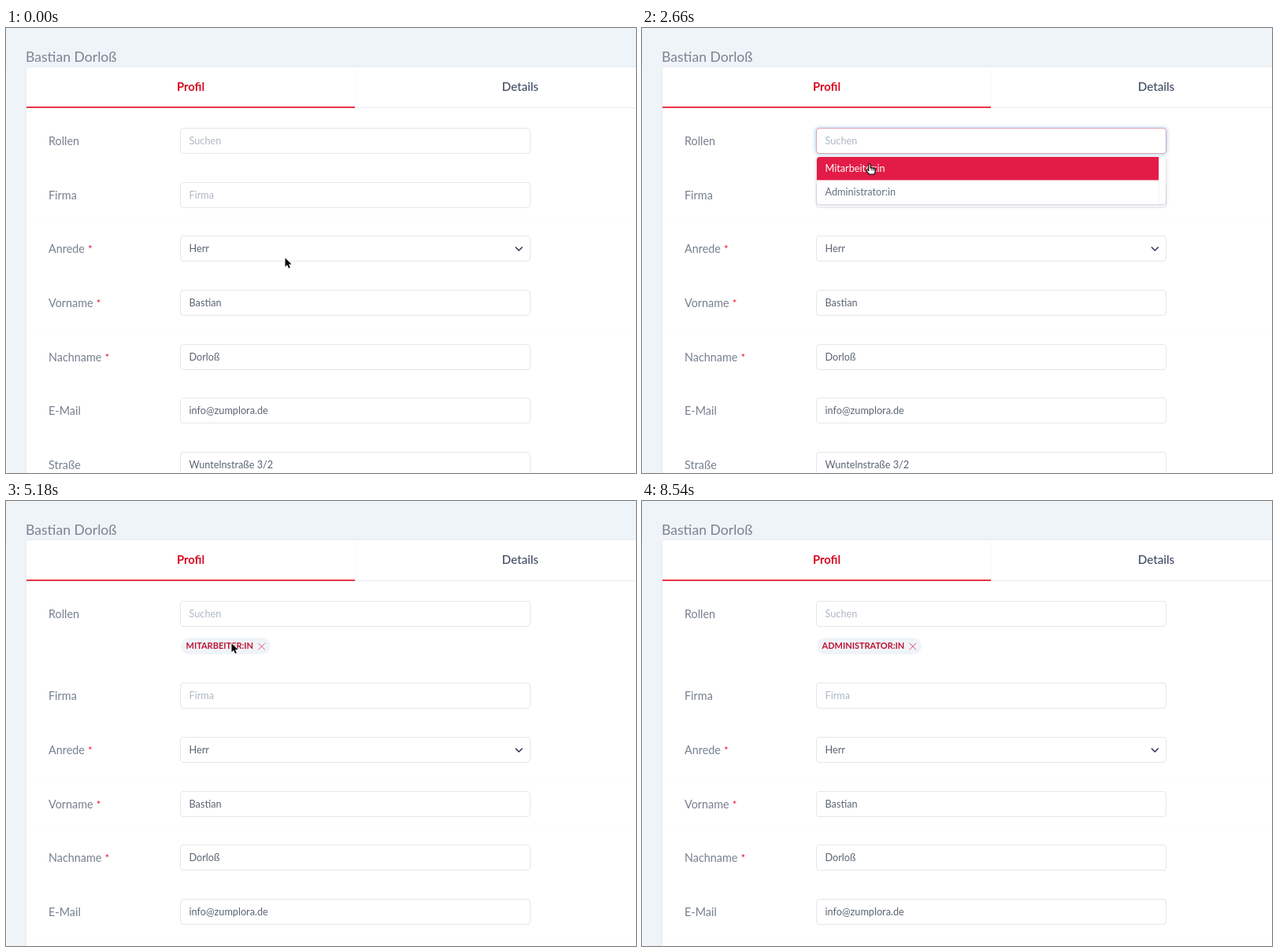
Write an HTML page with a canvas that moves like this. It is 800 px wide and 566 px high and loops after 8.61 s.

```html
<!DOCTYPE html>
<html lang="de">
<head>
<meta charset="utf-8">
<title>Profil</title>
<style>
  html, body { margin: 0; width: 100%; height: 100%; overflow: hidden; background: #eff4f9; }
  canvas { display: block; width: 800px; height: 566px; }
</style>
</head>
<body>
<canvas id="stage" width="800" height="566"></canvas>
<script>
const ctx = document.getElementById('stage').getContext('2d');
const LOOP = 8610, STEP = 70;
const FONT = 'Lato, "Open Sans", sans-serif';
const RED = '#e3061b';
const ROW = 68.65, TAG_SHIFT = 35.7;

const rows = [
  { label: 'Rollen', hint: 'Suchen' },
  { label: 'Firma', hint: 'Firma' },
  { label: 'Anrede', value: 'Herr', required: true, select: true },
  { label: 'Vorname', value: 'Bastian', required: true },
  { label: 'Nachname', value: 'Dorloß', required: true },
  { label: 'E-Mail', value: 'info@zumplora.de' },
  { label: 'Straße', value: 'Wuntelnstraße 3/2' }
];

// Pointer path: time, x, y
const path = [
  [0, 354.5, 292.5], [280, 354.5, 292.5], [1400, 284, 155.5], [2030, 284, 155.5],
  [2450, 289, 173], [3850, 289, 173], [4270, 286, 180],
  [5180, 286.5, 181], [5810, 324, 184], [6370, 324, 184], [6650, 318.5, 154],
  [7140, 318, 155], [7490, 304, 206], [8400, 304, 206]
];

const clicks = [1750, 4410, 6160, 6930, 7770];
const RING_TIME = 210;
const focusSpans = [[1750, 4410], [6930, 7770]];
const menuSpans = [[2030, 4620], [7070, 7910]];
const tagSpans = [[4620, 6300, 'MITARBEITER:IN'], [7910, LOOP, 'ADMINISTRATOR:IN']];

const spanAt = (spans, t) => spans.find(s => t >= s[0] && t < s[1]);
const rowTop = (i, shift) => Math.round(127 + ROW * i + (i ? shift : 0));

function pointerAt(t) {
  const i = path.findIndex(p => p[0] > t);
  if (i < 0) return null;
  const [t0, x0, y0] = path[i - 1], [t1, x1, y1] = path[i];
  const u = (t - t0) / (t1 - t0), k = u * u * (3 - 2 * u);
  return { x: x0 + (x1 - x0) * k, y: y0 + (y1 - y0) * k };
}

function text(str, x, y, size, color, weight = 400, align = 'left') {
  ctx.font = `${weight} ${size}px ${FONT}`;
  ctx.fillStyle = color;
  ctx.textAlign = align;
  ctx.fillText(str, x, y);
  return ctx.measureText(str).width;
}

function rect(x, y, w, h, color) {
  ctx.fillStyle = color;
  ctx.fillRect(x, y, w, h);
}

function box(x, y, w, h, r, fill, stroke) {
  ctx.beginPath();
  ctx.roundRect(x, y, w, h, r);
  if (fill) { ctx.fillStyle = fill; ctx.fill(); }
  if (stroke) { ctx.strokeStyle = stroke; ctx.lineWidth = 1; ctx.stroke(); }
}

function shadow(color, blur, y = 0) {
  ctx.shadowColor = color;
  ctx.shadowBlur = blur;
  ctx.shadowOffsetY = y;
}

function line(points, color, width) {
  ctx.beginPath();
  points.forEach(([x, y], i) => i ? ctx.lineTo(x, y) : ctx.moveTo(x, y));
  ctx.strokeStyle = color;
  ctx.lineWidth = width;
  ctx.lineCap = ctx.lineJoin = 'round';
  ctx.stroke();
}

function drawPage() {
  rect(0, 0, 800, 566, '#eff4f9');
  rect(0, 50, 1, 516, '#f7fafc');
  text('Bastian Dorloß', 25, 42.5, 17.6, '#7b8391');
  ctx.save();
  shadow('rgba(90,110,140,.1)', 3);
  box(26, 50, 800, 560, 4, '#fff');
  ctx.restore();
  rect(443, 50, 1, 51, '#f8f9fb');
  rect(443, 101, 357, 1, '#e9ecf0');
  rect(26, 100, 417, 1.6, RED);
  text('Profil', 234.5, 80, 14.8, '#d50c23', 700, 'center');
  text('Details', 653, 80, 15.2, '#414b63', 500, 'center');
}

function drawRow(row, i, shift, focused, caret) {
  const y = rowTop(i, shift);
  const w = text(row.label, 54, y + 21.5, 14.4, '#768090');
  if (row.required) text('*', 54 + w + 4, y + 21.5, 13.5, '#ea1930');
  if (focused) {
    ctx.save();
    shadow('#9fcdea', 5);
    box(220.5, y, 446, 33, 4, '#d5eaf7');
    ctx.restore();
  }
  box(221.5, y + 0.5, 444, 32, 3.5, '#fff', focused ? '#dfa4b3' : '#e3e7ec');
  text(row.value || row.hint, 232.5, y + 21, 12.7, row.value ? '#5a6473' : '#aeb8c6');
  if (caret) rect(232, y + 8, 1, 17, '#7d8796');
  if (row.select) {
    line([[647.3, y + 15], [651.3, y + 19], [655.3, y + 15]], '#28324c', 1.5);
  }
  if (i) rect(30, y + 50, 770, 1, '#fcfdfd');
}

function drawTag(name) {
  ctx.font = `700 11px ${FONT}`;
  const w = ctx.measureText(name).width;
  box(222, 174, w + 28, 21, 10.5, '#eff4f9');
  text(name, 228.5, 188.3, 11, '#bd1232', 700);
  const x = 228.5 + w + 10.5, y = 185;
  line([[x - 4, y - 4], [x + 4, y + 4]], '#e2546c', 1);
  line([[x + 4, y - 4], [x - 4, y + 4]], '#e2546c', 1);
}

function drawMenu(active) {
  ctx.save();
  shadow('rgba(60,75,100,.3)', 4, 1);
  box(222, 163.5, 443, 60.5, 4, '#fff');
  ctx.restore();
  rect(656, 165, 1, 57, '#f1f3f6');
  const radius = active ? [0, 0, 0, 4] : [4, 0, 0, 0];
  box(222, active ? 194 : 164, 434, 29.5, radius, '#e31b47');
  ['Mitarbeiter:in', 'Administrator:in'].forEach((name, i) => {
    text(name, 232.5, 182.7 + 30.3 * i, 12.7, i === active ? '#fff' : '#647081');
  });
}

const arrow = new Path2D('M0 0V11.2L2.6 8.8L4.5 13L6.3 12.2L4.6 8.1H8.1Z');
const hand = new Path2D('M-1.2 .8C-1.2 -.7 1.1 -.7 1.2 .8V5L2.6 4.6L3.6 5.2L5 4.9L6 5.8L7.4 6V9.3L6 13.2H-.5L-4.2 8.6C-4.8 7.3 -3.6 6.6 -2.5 7.5L-1.2 8.6Z');

function drawPointer(p, kind) {
  ctx.save();
  ctx.translate(p.x, p.y);
  ctx.lineJoin = 'round';
  if (kind === 'beam') {
    const bars = [
      [[-3, -6], [-1, -6], [0, -5], [1, -6], [3, -6]],
      [[0, -5], [0, 5]],
      [[-3, 6], [-1, 6], [0, 5], [1, 6], [3, 6]],
      [[-1.5, 2], [1.5, 2]]
    ];
    bars.forEach(b => line(b, '#fff', 2.4));
    bars.forEach(b => line(b, '#333', 1.1));
  } else if (kind === 'hand') {
    ctx.fillStyle = '#fff';
    ctx.fill(hand);
    ctx.strokeStyle = '#111';
    ctx.lineWidth = 1.2;
    ctx.stroke(hand);
    [[2.2, 5], [4.2, 5.2], [6, 6]].forEach(([x, y]) => line([[x, y], [x, y + 3]], '#222', 0.8));
  } else {
    ctx.strokeStyle = '#fff';
    ctx.lineWidth = 1.8;
    ctx.stroke(arrow);
    ctx.fillStyle = '#0a0a0a';
    ctx.fill(arrow);
  }
  ctx.restore();
}

function pointerKind(p, clicking, menu, tag, shift) {
  if (clicking) return 'arrow';
  if (menu && p.y > 164 && p.y < 224) return 'hand';
  if (tag && p.x > 318 && p.x < 332 && p.y > 176 && p.y < 194) return 'hand';
  const inField = p.x > 221 && p.x < 666 && rows.some((row, i) => {
    const top = rowTop(i, shift);
    return !row.select && p.y > top && p.y < top + 33;
  });
  return inField ? 'beam' : 'arrow';
}

function draw(t) {
  const focus = spanAt(focusSpans, t), menu = spanAt(menuSpans, t), tag = spanAt(tagSpans, t);
  const shift = tag ? TAG_SHIFT : 0;
  const caret = focus && (t - focus[0]) % 1000 < 500;
  const p = pointerAt(t);

  drawPage();
  rows.forEach((row, i) => drawRow(row, i, shift, focus && i === 0, caret && i === 0));
  if (tag) drawTag(tag[2]);
  if (menu) drawMenu(p && p.y > 194 ? 1 : 0);
  if (!p) return;

  const clicking = clicks.some(c => t >= c && t < c + RING_TIME);
  if (clicking) {
    ctx.beginPath();
    ctx.arc(p.x - 1, p.y - 2, 13, 0, Math.PI * 2);
    ctx.strokeStyle = 'rgba(125,185,90,.55)';
    ctx.lineWidth = 2;
    ctx.stroke();
  }
  drawPointer(p, pointerKind(p, clicking, menu, tag, shift));
}

const start = performance.now();
function tick() {
  const t = (performance.now() - start) % LOOP;
  draw(Math.floor(t / STEP) * STEP);
  requestAnimationFrame(tick);
}
tick();
</script>
</body>
</html>
```
